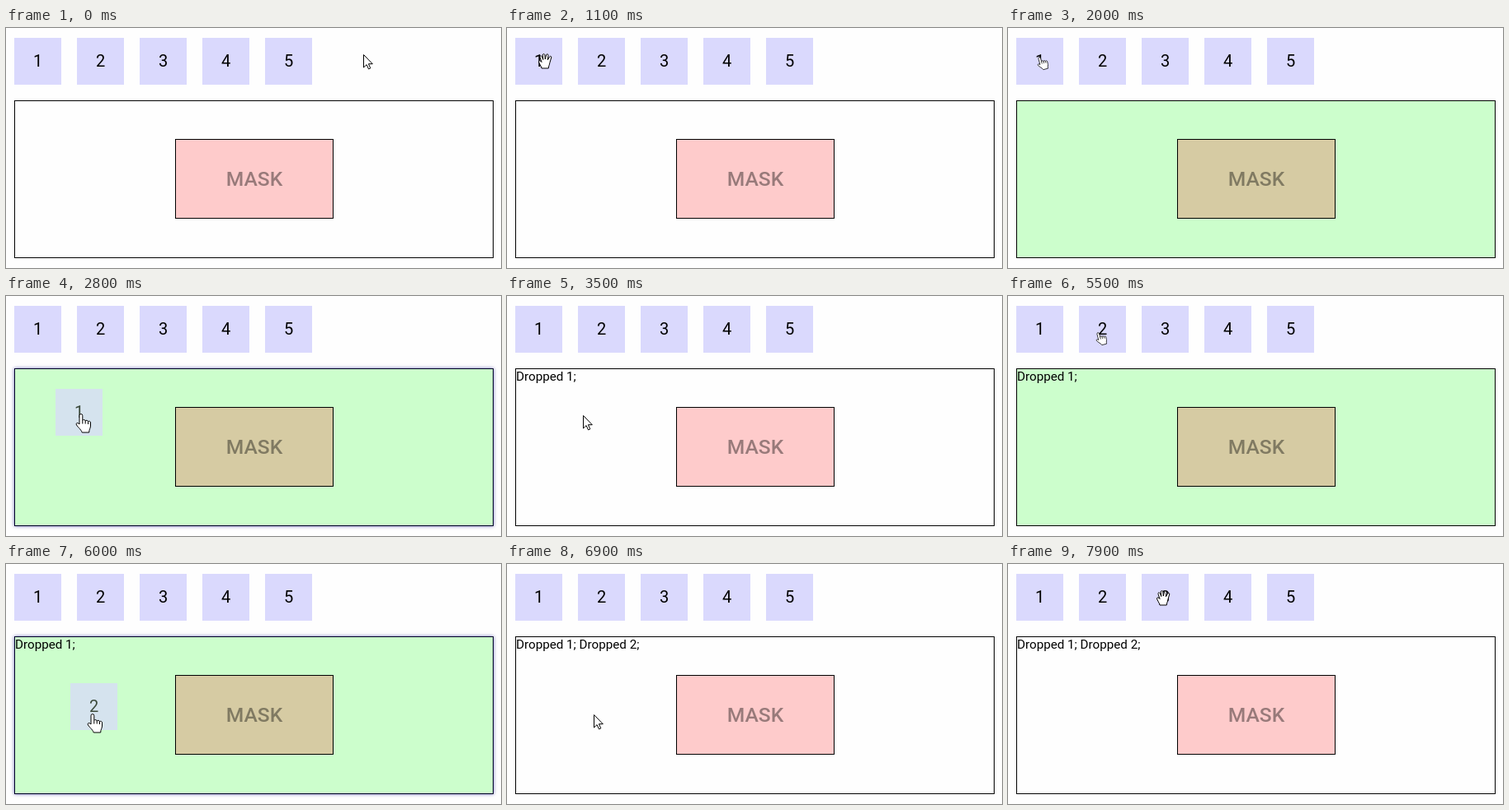
These frames come from a looping animation (600x292 px, 8 s). An HTML page:

```html
<!DOCTYPE html>
<html lang="en">
<head>
<meta charset="utf-8">
<title>Drag and drop with a mask</title>
<style>
  html, body { margin: 0; width: 100%; height: 100%; overflow: hidden; background: #fefefe; }
  #stage { position: relative; width: 600px; height: 292px; overflow: hidden; color: #000; font-family: Roboto, sans-serif; }
  #stage > * { position: absolute; box-sizing: border-box; }
  .item { top: 12px; width: 57px; height: 57px; background: #dad9fd; font-size: 20px; line-height: 57px; text-align: center; }
  #zone { left: 10px; top: 88px; width: 581px; height: 192px; border: 1px solid #000; font-size: 15.2px; line-height: 18px; }
  #zone.active { background: #ccfecc; }
  #zone.over { border-color: #000028; box-shadow: 0 0 4px #6a6ab4; }
  #mask { left: 205px; top: 135px; width: 192px; height: 97px; border: 1px solid #000; background: rgba(255, 0, 0, .2);
    color: rgba(0, 0, 0, .4); font-size: 24.6px; font-weight: 500; line-height: 96px; text-align: center; }
  #ghost { left: 0; top: 0; opacity: .7; }
  #pointer { left: 0; top: 0; width: 600px; height: 292px; }
  #pointer path { fill: #fff; stroke: #000; stroke-width: 1; stroke-linejoin: round; }
  #pointer .crease { fill: none; }
</style>
</head>
<body>
<div id="stage">
  <div id="zone"></div>
  <div id="mask">MASK</div>
  <div id="ghost" class="item"></div>
  <svg id="pointer" viewBox="0 0 600 292">
    <defs>
      <g id="hand">
        <path d="M-2 12V1.5a1.9 1.9 0 0 1 3.8 0V7.5a1.8 1.8 0 0 1 3.4.6a1.8 1.8 0 0 1 3.3.8a1.7 1.7 0 0 1 3 1.2V14c0 3-1.8 4-1.8 8H1.2C0 18-5.5 14.5-5.8 12c-.2-1.8 2-2.2 3.8 0z"/>
        <path class="crease" d="M1.8 7.5v4M5.2 8v3.5M8.5 9v3"/>
      </g>
    </defs>
    <g id="cursor">
      <path data-kind="arrow" d="M.5.5v15.5l3.6-3.4 2.4 5.3 2.3-1-2.4-5.2h4.9z"/>
      <path data-kind="grab" d="M-4 9C-4.5 6-8 2-7.5.5C-7-.8-5.2-.3-4 1.5L-6-4.5c-.5-1.8 1.6-2.4 2.3-.8L-2.2-1.5-2.8-7c0-1.9 2.3-1.9 2.6-.2L.3-2 1.6-7.2c.5-1.7 2.6-1.2 2.4.5L3.4-1.3 5.6-5c.9-1.4 2.6-.5 2.1 1L5.8 2.5C5.5 5 4.5 6 4.3 9z"/>
      <use data-kind="hold" href="#hand" transform="translate(-4 -7) rotate(-15) scale(.7)"/>
      <use data-kind="link" href="#hand"/>
    </g>
  </svg>
</div>
<script>
  const LOOP = 8000, STEP = 100;
  const LEFT = 10, TOP = 12, PITCH = 76, SIZE = 57, COUNT = 5;

  // time, x, y of the cursor
  const route = [
    [0, 433, 32], [200, 433, 32], [1000, 47, 41], [1100, 46, 40], [1700, 46, 40],
    [1900, 42, 43], [2000, 42, 43], [2700, 90, 143], [2900, 92, 145], [3700, 92, 145],
    [4400, 114, 38], [5200, 114, 38], [5400, 113, 49], [5500, 113, 52], [5900, 105, 183],
    [7200, 105, 183], [7700, 189, 41], [7900, 188, 41], [LOOP, 188, 41]
  ];
  const drags = [
    { item: 1, start: 1900, drop: 3100, dx: 31, dy: 31 },
    { item: 2, start: 5400, drop: 6800, dx: 27, dy: 38 }
  ];

  const byId = id => document.getElementById(id);
  const stage = byId('stage'), zone = byId('zone'), ghost = byId('ghost'), cursor = byId('cursor');

  for (let n = 1; n <= COUNT; n++) {
    const item = document.createElement('div');
    item.className = 'item';
    item.textContent = n;
    item.style.left = LEFT + (n - 1) * PITCH + 'px';
    stage.insertBefore(item, zone);
  }

  function cursorAt(t) {
    const i = route.findIndex(key => key[0] > t);
    const [t0, x0, y0] = route[i - 1], [t1, x1, y1] = route[i];
    const p = (t - t0) / (t1 - t0), e = p * p * (3 - 2 * p);
    return [x0 + (x1 - x0) * e, y0 + (y1 - y0) * e];
  }

  function overItem(x, y) {
    const dx = x - LEFT;
    return y >= TOP && y < TOP + SIZE && dx >= 0 && dx < COUNT * PITCH && dx % PITCH < SIZE;
  }

  function cursorKind(t, x, y, drag) {
    if (drag) return t - drag.start < 200 ? 'hold' : 'link';
    return overItem(x, y) ? 'grab' : 'arrow';
  }

  function draw(t) {
    const [x, y] = cursorAt(t);
    const drag = drags.find(d => t >= d.start && t < d.drop);
    const kind = cursorKind(t, x, y, drag);

    zone.textContent = drags.filter(d => t >= d.drop).map(d => `Dropped ${d.item};`).join(' ');
    zone.classList.toggle('active', !!drag);
    zone.classList.toggle('over', !!drag && y > 88);

    ghost.style.display = drag && kind === 'link' ? '' : 'none';
    if (drag) {
      ghost.textContent = drag.item;
      ghost.style.transform = `translate(${Math.round(x - drag.dx)}px, ${Math.round(y - drag.dy)}px)`;
    }

    cursor.setAttribute('transform', `translate(${Math.round(x)} ${Math.round(y)})`);
    for (const shape of cursor.children) {
      shape.style.display = shape.dataset.kind === kind ? '' : 'none';
    }
  }

  const begin = performance.now();
  function tick() {
    const t = (performance.now() - begin) % LOOP;
    draw(Math.floor(t / STEP) * STEP);
    requestAnimationFrame(tick);
  }
  tick();
</script>
</body>
</html>
```
